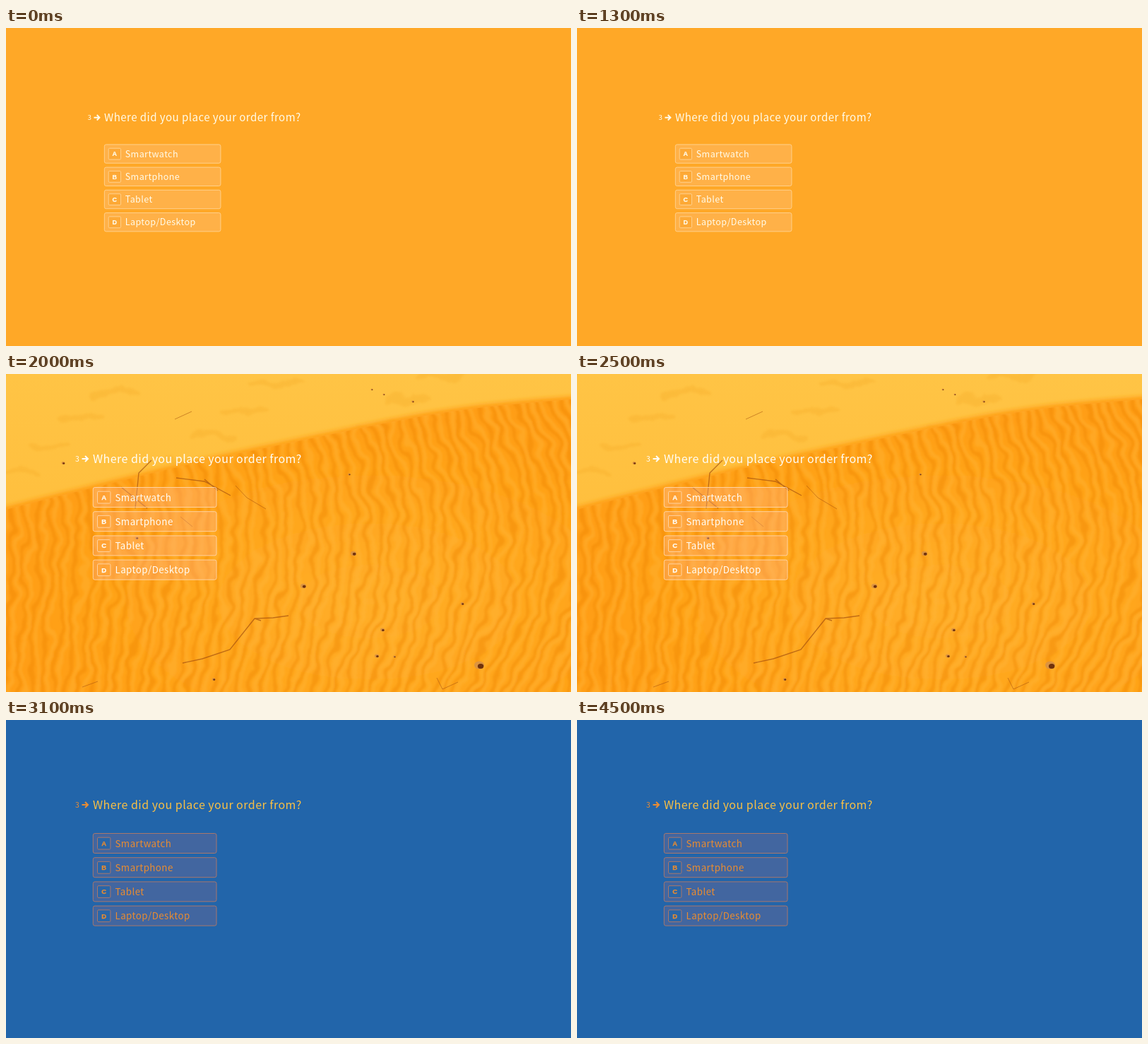
An HTML page for the animation above (4.6 s loop, 800 by 450 pixels).

```html
<!DOCTYPE html>
<html lang="en">
<head>
<meta charset="utf-8">
<title>Survey themes</title>
<style>
html, body { margin: 0; height: 100%; overflow: hidden; }
svg { display: block; width: 800px; height: 450px; }
.plain { --bg: #ffa827; --title: #fffbea; --num: #fffbea; --text: #fffbea; --fill: #ffb148; --line: #ffd391; --key: #fda936; }
.sand { --bg: #ffa51c; --title: #fffdf6; --num: #fffdf6; --text: #fffdf6; --fill: rgba(255, 178, 140, .36); --line: #ffd2a0; --key: rgba(255, 160, 45, .55); }
.blue { --bg: #2265aa; --title: #fac044; --num: #ea8c33; --text: #ea8c30; --fill: #4266a0; --line: #a8776c; --key: #2a66a7; }
#bg { fill: var(--bg); }
#photo { display: none; }
.sand #photo { display: inline; }
text { font-family: "Noto Sans CJK JP", "Noto Sans CJK SC", "Noto Sans CJK", "Noto Sans", sans-serif; font-size: 13.3px; letter-spacing: .45px; fill: var(--text); }
.title { font-size: 16px; letter-spacing: .47px; fill: var(--title); }
.num { font-size: 10.5px; fill: var(--num); }
.letter { font: bold 9.5px "Liberation Sans", Arial, sans-serif; letter-spacing: 0; text-anchor: middle; stroke: var(--text); stroke-width: .25; }
.box { fill: var(--fill); stroke: var(--line); }
.key { fill: var(--key); stroke: var(--line); }
.arrow { fill: none; stroke: var(--num); stroke-width: 2; }
</style>
</head>
<body>
<svg id="stage" class="plain" viewBox="0 0 800 450">
  <defs>
    <linearGradient id="sky" x2="0" y2="1"><stop stop-color="#ffc445"/><stop offset="1" stop-color="#ffb934"/></linearGradient>
    <radialGradient id="slope" cx=".64" cy=".68" r=".62"><stop stop-color="#ffae29"/><stop offset=".4" stop-color="#ffa820"/><stop offset="1" stop-color="#ff9e12"/></radialGradient>
    <filter id="soft" x="-10%" y="-10%" width="120%" height="120%"><feGaussianBlur stdDeviation="3"/></filter>
    <filter id="rough" filterUnits="userSpaceOnUse" x="-40" y="-40" width="880" height="530">
      <feTurbulence type="fractalNoise" baseFrequency=".028" numOctaves="2" seed="4"/>
      <feDisplacementMap in="SourceGraphic" scale="26" xChannelSelector="R" yChannelSelector="G"/>
      <feGaussianBlur stdDeviation="1.7"/>
    </filter>
    <clipPath id="dune"><path d="M0 192C60 176 120 162 200 142S400 98 520 73S700 44 800 36V450H0Z"/></clipPath>
  </defs>
  <rect id="bg" width="800" height="450"/>
  <g id="photo">
    <rect width="800" height="450" fill="url(#sky)"/>
    <g id="specks" fill="#f5aa27" opacity=".3" filter="url(#rough)"/>
    <path d="M-9 190C60 172 120 158 200 138S400 94 520 69S700 40 809 31V459H-9Z" fill="url(#slope)" filter="url(#soft)"/>
    <g clip-path="url(#dune)"><g id="ripples" fill="none" filter="url(#rough)"/></g>
    <g fill="none" stroke="#a6520f" stroke-width="1.4" opacity=".7">
      <path d="M250 409L278 403L317 390L352 346L378 345L400 342M352 346L361 349"/>
      <path d="M241 147L281 152L318 172M281 149L300 165M206 122L188 140L183 190M163 160L200 190"/>
      <path d="M325 158L341 175L368 191M247 202L264 216M239 64L263 53M610 430L618 446L640 436M108 443L130 435" stroke-width=".8"/>
    </g>
    <g id="pebbles"/>
  </g>
  <g id="form">
    <text class="num" x="98" y="124">3</text>
    <path class="arrow" d="M107.5 120H116M112 116L116 120L112 124"/>
    <text class="title" x="123" y="126">Where did you place your order from?</text>
  </g>
</svg>
<script>
const $ = id => document.getElementById(id);
const stage = $('stage'), form = $('form');

function add(parent, tag, attrs, text = '') {
  const el = document.createElementNS('http://www.w3.org/2000/svg', tag);
  for (const k in attrs) el.setAttribute(k, attrs[k]);
  el.textContent = text;
  parent.append(el);
}

['Smartwatch', 'Smartphone', 'Tablet', 'Laptop/Desktop'].forEach((label, i) => {
  const y = 160.5 + 34.2 * i;
  add(form, 'rect', { class: 'box', x: 123.3, y, width: 174.7, height: 28, rx: 2.5 });
  add(form, 'rect', { class: 'key', x: 129.5, y: y + 5.7, width: 18.4, height: 16.8, rx: 1.5 });
  add(form, 'text', { class: 'letter', x: 138.7, y: y + 17.5 }, 'ABCD'[i]);
  add(form, 'text', { x: 154.5, y: y + 19 }, label);
});

// Wind ripples: bowed lines whose bend grows to the right.
function ripple(i, shift) {
  const x0 = i * 17.5 + shift, bend = 8 + 52 * Math.max(0, x0 / 800);
  let d = '';
  for (let y = 20; y <= 470; y += 10) {
    const bow = Math.sin(Math.PI * (y - 40) / 380);
    const x = x0 + bend * bow + 2 * Math.sin(y / 19 + i * 2.1);
    d += (d ? 'L' : 'M') + x.toFixed(1) + ' ' + y;
  }
  return d;
}
for (let i = -4; i < 50; i++) {
  add($('ripples'), 'path', { d: ripple(i, 0), stroke: '#ef8505', 'stroke-width': 4.5, opacity: .42 });
  add($('ripples'), 'path', { d: ripple(i, 8), stroke: '#ffb739', 'stroke-width': 5, opacity: .36 });
}

for (let i = 0; i < 200; i++) {
  add($('specks'), 'ellipse', { cx: i * 137.5 % 643, cy: i * 61.8 % 173, rx: 5 + i % 5, ry: 3 + i % 3 });
}

const pebbles = [[81, 126, 2.5], [492, 254, 4], [421, 300, 4], [533, 362, 3], [525, 399, 3], [646, 325, 2.5],
  [670, 412, 7], [185, 232, 2.5], [518, 22, 1.5], [535, 29, 1.5], [576, 39, 1.8], [294, 432, 2.5], [486, 142, 1.8], [550, 400, 1.8]];
for (const [cx, cy, r] of pebbles) {
  add($('pebbles'), 'ellipse', { cx, cy, rx: r, ry: r * .8, fill: '#dc9440' });
  add($('pebbles'), 'ellipse', { cx: cx + r * .3, cy: cy + r * .2, rx: r * .6, ry: r * .5, fill: '#70320c' });
}

function draw(now) {
  const t = now % 4600;
  const scene = t < 1550 ? 'plain' : t < 3090 ? 'sand' : 'blue';
  stage.setAttribute('class', scene);
  form.setAttribute('transform', scene === 'plain' ? 'translate(23.2 13.7) scale(.942)' : '');
}
const start = performance.now();
function tick() {
  draw(performance.now() - start);
  requestAnimationFrame(tick);
}
tick();
</script>
</body>
</html>
```
